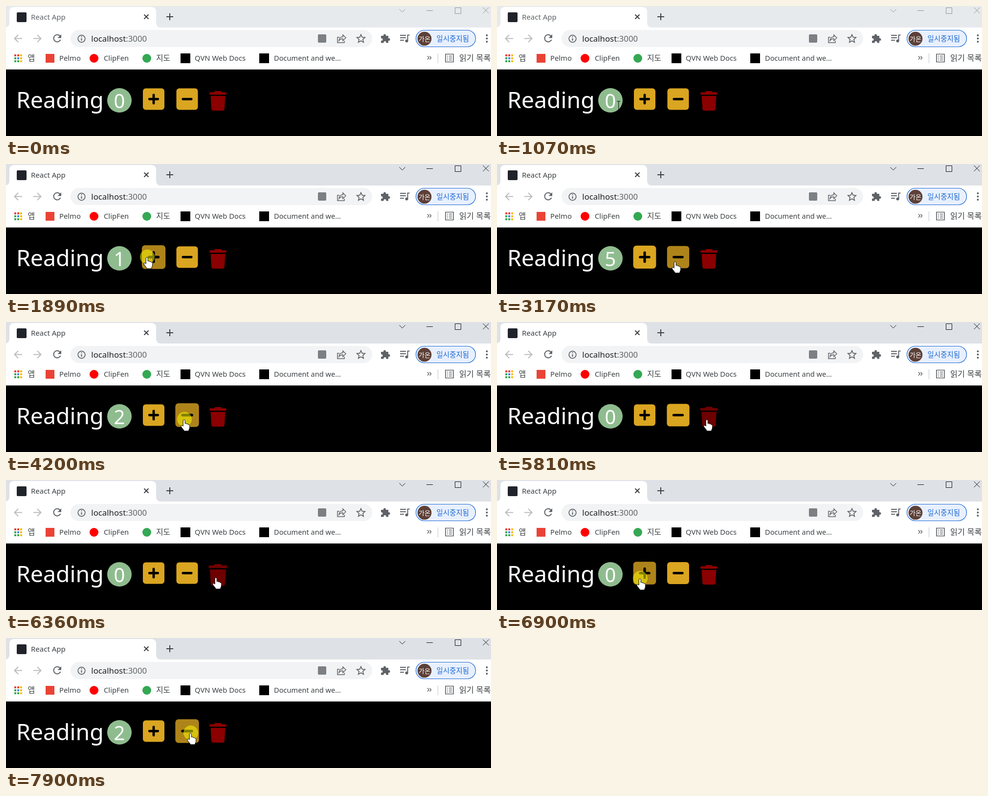
Animation, 992 px wide and 266 px high, one loop 8000 ms. Source, as an HTML page:

```html
<!DOCTYPE html>
<html lang="ko">
<head>
<meta charset="utf-8">
<title>Reading counter</title>
<style>
  html, body { margin: 0; width: 100%; height: 100%; overflow: hidden; background: #000; }
  svg { display: block; --strip: #e7eaed; --control: #8f9295; --tab: #5f6368; }
  svg.focused { --strip: #dee1e6; --control: #111; --tab: #3c4043; }
  text { font: 14.8px "Noto Sans", "Noto Sans CJK KR", sans-serif; fill: #3c4043; }
  .ko { font: 15.8px "Noto Sans CJK KR", sans-serif; }
  .line { fill: none; stroke: #5f6368; stroke-width: 2; }
  .control { fill: none; stroke: var(--control); stroke-width: 1; }
  .page text { fill: #fff; font-size: 46.400px; }
  .page #count { font-size: 40px; text-anchor: middle; }
  .glyph { stroke: #000; stroke-width: 4.800; stroke-linecap: round; }
</style>
</head>
<body>
<svg id="stage" width="992" height="266" viewBox="0 0 992 266">
  <!-- tab strip -->
  <rect width="992" height="44" fill="var(--strip)"/>
  <rect y="44" width="992" height="85" fill="#fff"/>
  <rect y="129" width="992" height="1" fill="#dadce0"/>
  <path d="M-3 44Q7 44 7 34V12Q7 2 17 2H297Q307 2 307 12V34Q307 44 317 44Z" fill="#fff"/>
  <rect x="22" y="13" width="20" height="20" rx="2" fill="#20232a"/>
  <text x="51" y="28" style="font-size:15px;fill:var(--tab)">React App</text>
  <path class="line" style="stroke:#3c4043" d="M282.500 17.500l9 9m0-9l-9 9"/>
  <path class="line" style="stroke:#3c4043" d="M328 22h14m-7-7v14"/>
  <path class="control" d="M804.500 6.500l6 6 6-6M860 9.500h13M918.500 3.500h12v12h-12zM975.500 3l12 12m0-12l-12 12"/>

  <!-- toolbar -->
  <path class="line" style="stroke:#babcbe" d="M33 66.500H18m7-7.500l-7.500 7.500 7.500 7.500M56 66.500h15m-7-7.500l7.500 7.500-7.500 7.500"/>
  <path class="line" d="M110.500 61.500A7.300 7.300 0 1 0 111.500 69"/>
  <path d="M113 58v7.500h-7.500z" fill="#5f6368"/>
  <rect x="132" y="49" width="617" height="35" rx="17.500" fill="#f1f3f4"/>
  <circle class="line" style="stroke-width:1.700" cx="154.500" cy="67" r="7.300"/>
  <path class="line" d="M154.500 66v5m0-9v2"/>
  <text x="174.300" y="73" style="font-size:16.800px;fill:#202124">localhost<tspan fill="#5f6368">:3000</tspan></text>
  <rect x="638" y="58" width="17" height="17" rx="2" fill="#7c8084"/>
  <path class="line" style="stroke-width:1.500" d="M682 64h-4v11h14v-4M681 71q1-8 8-8v-4l6 6-6 6v-4q-5 0-8 4z"/>
  <path class="line" style="stroke-width:1.700" d="M726 58.500l2.400 5.400 5.900.6-4.400 3.900 1.300 5.800-5.200-3-5.200 3 1.300-5.800-4.400-3.900 5.900-.6z"/>
  <path fill="#5f6368" d="M767 61h5v-1a2.500 2.500 0 0 1 5 0v1h5v5h1a2.500 2.500 0 0 1 0 5h-1v4.500h-4.500v-1a2.500 2.500 0 0 0-5 0v1H767V71h1a2.500 2.500 0 0 0 0-5h-1z"/>
  <path class="line" d="M806 60h12m-12 5h12m-12 5h8M821.500 72V59.500h4"/>
  <circle cx="819.500" cy="71.500" r="3" fill="#5f6368"/>
  <rect x="838.500" y="49.500" width="122" height="34" rx="17" fill="#e8f0fe" stroke="#1967d2" stroke-width="1.200"/>
  <circle cx="856" cy="67" r="14.300" fill="#5d4037"/>
  <text class="ko" x="856" y="71.500" text-anchor="middle" style="font-size:13px;fill:#fff">가온</text>
  <text class="ko" x="880.500" y="71.500" style="font-size:14.500px;fill:#1967d2">일시중지됨</text>
  <path d="M983.500 60v0M983.500 66.500v0M983.500 73v0" stroke="#5f6368" stroke-width="4" stroke-linecap="round"/>

  <!-- bookmarks -->
  <g id="apps"></g>
  <text class="ko" x="44.500" y="112">앱</text>
  <rect x="81" y="98" width="18" height="18" fill="#ea4335"/>
  <text x="109" y="112">Pelmo</text>
  <circle cx="180" cy="107" r="9" fill="#f00"/>
  <text x="200" y="112">ClipFen</text>
  <circle cx="288" cy="107" r="9" fill="#34a853"/>
  <text class="ko" x="307" y="112">지도</text>
  <rect x="357" y="97" width="20" height="20"/>
  <text x="386" y="112">QVN Web Docs</text>
  <rect x="518" y="97" width="20" height="20"/>
  <text x="548" y="112" style="font-size:14.600px">Document and we…</text>
  <path class="line" style="stroke-width:1.500" d="M862 102.500l3 3.500-3 3.500m4.500-7l3 3.500-3 3.500"/>
  <path d="M883.500 97v20" stroke="#c0c4c9"/>
  <path class="line" style="stroke-width:1.700" d="M899 98.500h16v16h-16zM902 102.500h2m2 0h6m-10 4h2m2 0h6m-10 4h2m2 0h6"/>
  <text class="ko" x="927" y="112" style="font-size:16.300px">읽기 목록</text>

  <!-- page -->
  <g class="page">
    <rect y="130" width="992" height="136"/>
    <text x="21" y="209">Reading</text>
    <circle cx="232" cy="193" r="25" fill="#8fbc8f"/>
    <text id="count" x="232" y="209">0</text>
    <g id="plus"><rect x="-22" y="-22" width="44" height="44" rx="6"/><path class="glyph" d="M-8.700 0h17.400M0-8.700v17.400"/></g>
    <g id="minus"><rect x="-22" y="-22" width="44" height="44" rx="6"/><path class="glyph" d="M-8.700 0h17.400"/></g>
    <g id="trash"><path d="M-15-17.500h7.500l.6-1.100q.7-1.400 2.200-1.400h9.400q1.500 0 2.200 1.400l.6 1.100H15a2.500 2.500 0 0 1 0 5H-15a2.500 2.500 0 0 1 0-5zM-15-10H15l-1.700 26.500q-.2 3.500-3.700 3.500H-9.600q-3.500 0-3.700-3.500z"/></g>
  </g>

  <g id="pointer">
    <circle id="press" r="15" fill="#ff0" fill-opacity=".5"/>
    <path id="hand" transform="translate(-.8 1)" fill="#fff" stroke="#000" d="M-2 2C-2-.6 2-.6 2 2V8C4 6.500 5.500 7.500 5.700 9 7.300 8 9 8.700 9.200 10.300 10.500 9.800 11.500 10.800 11.500 12.500V16C11.500 18 9.500 20 9.500 23H0C0 21-4 18-6 14-7.500 11.500-4.500 10.500-2 13Z"/>
    <path id="arrow" fill="#fff" stroke="#000" d="M0 0V17L4 13.500 7 20 9.500 19 6.600 12.500H12Z"/>
    <path id="beam" fill="none" stroke="#000" d="M-3.500-8.500h7m-3.500 0v19m-3.500 0h7"/>
  </g>
</svg>
<script>
const $ = id => document.getElementById(id);
const LOOP = 8000, GROW = 300, FOCUS_AT = 1690;

// Hover spans in ms for each button
const buttons = [
  { id: 'plus', x: 302, y: 190.5, fill: '#daa520', dark: '#ae841a', hover: [[1373, 3110], [6795, 7505]] },
  { id: 'minus', x: 370.5, y: 190.5, fill: '#daa520', dark: '#ae841a', hover: [[3119, 5721], [6641, 6743], [7565, LOOP]] },
  { id: 'trash', x: 433.5, y: 194, fill: '#8b0000', dark: '#6f0000', hover: [[5775, 6592]] },
];
// Pointer path: time, x, y
const path = [
  [660, 362, 260], [900, 318, 236], [1100, 237, 198], [1200, 237, 197], [1420, 289, 190],
  [3010, 289, 190], [3150, 365, 199], [5650, 365, 199], [5810, 430, 199],
  [6560, 430, 199], [6870, 293, 201], [7420, 293, 201], [7640, 378, 194], [LOOP, 378, 194],
];
const presses = [
  [1690, 2040], [2300, 2370], [2500, 2570], [2700, 2770], [2900, 2970], [3380, 3520],
  [3720, 3790], [3930, 4060], [4195, 4270], [4470, 4540], [4800, 4870], [5060, 5130],
  [5330, 5400], [6090, 6160], [6830, 6970], [7110, 7180], [7310, 7380], [7770, LOOP],
];
const ups = [1890, 2370, 2570, 2770, 2970, 6970, 7180, 7380];
const downs = [3450, 3790, 4060, 4270, 4540, 7840];

const within = (spans, t) => spans.some(([from, to]) => t >= from && t < to);
const passed = (times, t) => times.filter(at => t >= at).length;
const ease = ms => 1 - (1 - Math.min(1, Math.max(0, ms / GROW))) ** 2;
const show = (id, on) => $(id).setAttribute('display', on ? 'inline' : 'none');

function pointerAt(t) {
  const next = Math.max(1, path.findIndex(([at]) => at > t));
  const [t0, x0, y0] = path[next - 1], [t1, x1, y1] = path[next];
  const p = (t - t0) / (t1 - t0);
  return [x0 + (x1 - x0) * p, y0 + (y1 - y0) * p];
}

function draw(t) {
  $('stage').classList.toggle('focused', t >= FOCUS_AT);
  $('count').textContent = passed(ups, t) - passed(downs, t);

  let hovering = false;
  for (const { id, x, y, fill, dark, hover } of buttons) {
    const over = within(hover, t);
    const grown = hover.reduce((sum, [from, to]) => sum + ease(t - from) - ease(t - to), 0);
    $(id).setAttribute('fill', over ? dark : fill);
    $(id).setAttribute('transform', `translate(${x} ${y}) scale(${1 + 0.1 * Math.min(1, grown)})`);
    hovering ||= over;
  }

  const [x, y] = pointerAt(t);
  const onText = x < 257;
  $('pointer').setAttribute('transform', `translate(${x} ${y})`);
  show('pointer', t >= path[0][0]);
  show('press', within(presses, t));
  show('hand', hovering);
  show('beam', !hovering && onText);
  show('arrow', !hovering && !onText);
}

const appColors = ['#ea4335', '#ea4335', '#fbbc04', '#34a853', '#4285f4', '#fbbc04', '#34a853', '#34a853', '#fbbc04'];
$('apps').innerHTML = appColors.map((color, i) =>
  `<rect x="${17 + i % 3 * 6}" y="${99 + Math.floor(i / 3) * 6}" width="4" height="4" fill="${color}"/>`).join('');

const start = performance.now();
function tick() {
  draw((performance.now() - start) % LOOP);
  requestAnimationFrame(tick);
}
tick();
</script>
</body>
</html>
```
